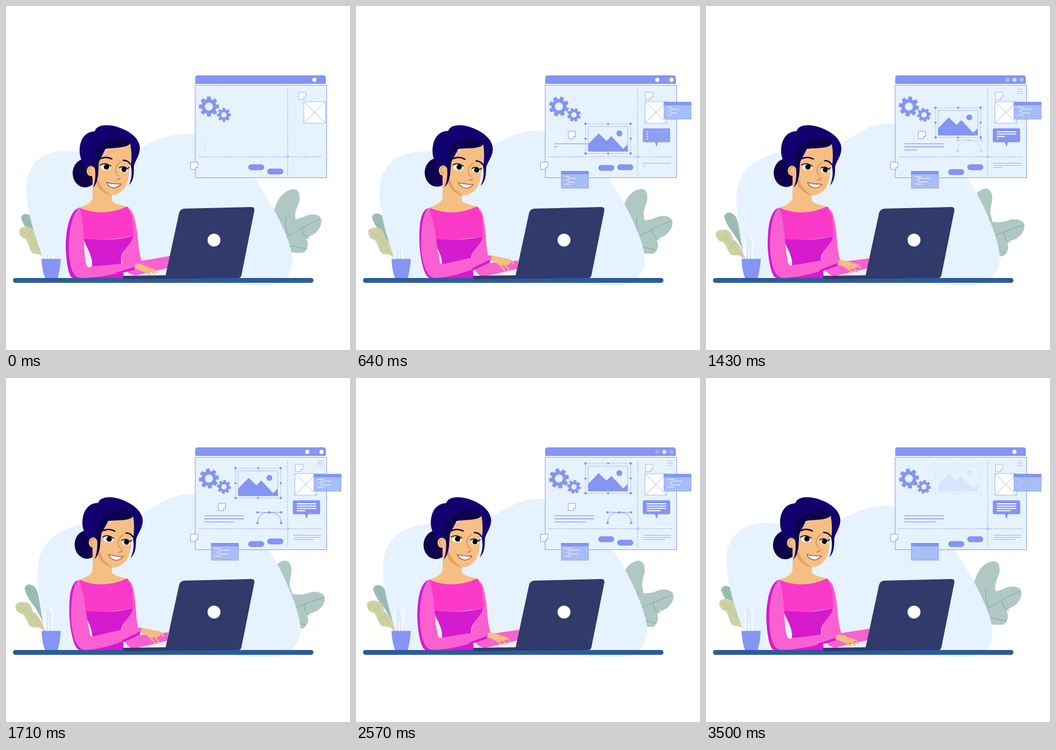
Write an HTML page that moves like this. It is 640 px wide and 640 px high and loops after 3570 ms.

```html
<!DOCTYPE html>
<html lang="en">
<head>
<meta charset="utf-8">
<title>Designer at work</title>
<style>
  html, body { margin: 0; width: 100%; height: 100%; overflow: hidden; background: #fff; }
  svg { display: block; width: 100%; height: 100%; }
  .line { fill: none; stroke: #8495f3; }
  .main { fill: #8495f3; }
  .skin { fill: #f5bf84; }
  .light { fill: #fb60d3; }
  .plum { fill: #d41bcd; }
  .hair { fill: #130070; }
  .dark { fill: #0e024c; }
</style>
</head>
<body>
<svg viewBox="0 0 640 640" xmlns="http://www.w3.org/2000/svg">
  <defs>
    <g id="note" stroke="#8495f3">
      <path d="M0 0H13.5V9.5L9.5 13.5H0Z" fill="#fff"/>
      <path d="M13.5 9.5H9.5V13.5" fill="#e6f2fe"/>
    </g>
  </defs>

  <!-- plants -->
  <g id="teal">
    <path d="M75 475C58 425 36 422 28 394C30 386 40 384 48 392C58 402 60 440 75 475Z" fill="#9bbcb4"/>
    <path d="M34 393Q50 415 62 445" fill="none" stroke="#86aaa4" stroke-width=".7"/>
  </g>
  <g id="olive">
    <path d="M74 474C65 458 57 463 50 460C42 455 44 442 36 433C28 432 24 424 25 416C30 409 42 410 49 414C58 422 52 430 60 435C68 445 72 460 74 474Z" fill="#ced1a3"/>
    <path d="M29 418Q52 432 71 468M44 429L47 418M42 428L35 429M56 443L58 434M54 442L46 446" fill="none" stroke="#b8bd8c" stroke-width=".7"/>
  </g>
  <path id="leafUp" fill="#b0c8c4" d="M505 450C498 420 490 395 501 374C506 356 520 341 536 341C548 342 548 358 544 368C538 382 537 388 539 398L540 440Z"/>
  <g id="leafLow">
    <path fill="#b0c8c4" d="M505 450L515 395C530 400 540 397 550 394C562 387 575 385 584 392C590 400 586 412 578 420C570 429 558 428 560 436C564 445 560 455 553 459C545 460 535 458 515 459Z"/>
    <path d="M510 438Q545 414 585 396M521 392Q518 412 526 427M550 413Q551 428 565 433M515 446Q537 446 559 452" fill="none" stroke="#6f9cb0" stroke-width=".9"/>
  </g>
  <path id="blob" fill="#e6f2fe"/>
  <g id="sprigs" stroke-width="1.8" stroke-dasharray="7 2"></g>
  <path class="main" d="M66 470.500H102Q100 495 96 506H72.500Q67 492 66 470.500Z"/>

  <!-- browser window -->
  <path class="main" d="M352 145V134Q352 129 357 129H590Q595 129 595 134V145Z"/>
  <g id="dots" fill="#fff"></g>
  <rect class="line" x="352" y="147.500" width="244.500" height="172" style="fill:#e6f2fe"/>
  <path class="line" d="M524 154V315M358 280.500H590" stroke-dasharray="2 2"/>
  <circle class="line" cx="524" cy="280.500" r="2" style="fill:#e6f2fe"/>
  <path class="main" id="gear1" fill-rule="evenodd"/>
  <path class="main" id="gear2" fill-rule="evenodd"/>
  <use href="#note" x="343.500" y="290.500"/>
  <use href="#note" x="538.500" y="160.500" id="sideNote" opacity=".65"/>
  <use href="#note" id="midNote"/>
  <g id="box" stroke="#8fb0ef" stroke-width=".9">
    <rect x="537.500" y="178" width="40.500" height="40" fill="#fff"/>
    <path d="M537.500 178L578 218M578 178L537.500 218"/>
  </g>
  <g id="menu" stroke="#a9bbf5"><path d="M579 154.500H589.500M579 158.500H589.500M579 162.500H589.500"/></g>
  <g id="text1" stroke="#8495f3" stroke-width="1.300"></g>
  <g id="text2" stroke="#8495f3" stroke-width=".8"></g>
  <g id="bubble">
    <path class="main" stroke="#6f82ec" stroke-width=".7" d="M536 228H582Q584 228 584 230V251Q584 253 582 253H561.500L559 261L556.500 253H536Q534 253 534 251V230Q534 228 536 228Z"/>
    <g id="text3" stroke="#fff" stroke-width="1.800"></g>
  </g>
  <g id="picture">
    <rect class="line" x="427" y="159" width="84" height="55.500" stroke-dasharray="2 2"/>
    <rect class="line" x="432" y="164" width="73.500" height="46.500" stroke-width=".6"/>
    <path class="main" d="M432 197L451.500 177L466 191L475 182L497 205.500L505.500 197V210.500H432Z"/>
    <circle class="main" cx="490" cy="177" r="5.500"/>
    <path class="main" d="M425 157h4v4h-4zM509 157h4v4h-4zM425 212.500h4v4h-4zM509 212.500h4v4h-4zM469 156.500l2.500 2.500-2.500 2.500-2.500-2.500zM469 212l2.500 2.500-2.500 2.500-2.500-2.500zM427 184.500l2.500 2.500-2.500 2.500-2.500-2.500zM511 184.500l2.500 2.500-2.500 2.500-2.500-2.500z"/>
  </g>
  <g id="curve">
    <path class="line" d="M468 250H512M468 269.500C468 257 477 250 490 250C503 250 512 257 512 269.500"/>
    <path class="main" d="M466 248h4v4h-4zM488 248h4v4h-4zM510 248h4v4h-4z"/>
    <circle class="main" cx="468" cy="269.500" r="2.200"/><circle class="main" cx="512" cy="269.500" r="2.200"/>
  </g>
  <rect class="main" id="pill1" x="451" width="29" height="10" rx="5" stroke="#6f82ec" stroke-width=".7"/>
  <rect class="main" id="pill2" x="486.500" width="29" height="10" rx="5" stroke="#6f82ec" stroke-width=".7"/>
  <g id="codes"></g>

  <!-- woman -->
  <ellipse class="dark" id="bun" cx="147" cy="311" rx="23" ry="26.500"/>
  <path class="skin" d="M161 310V355Q161 368 136 375Q180 396 225 373Q200 368 197 362V340Z"/>
  <path class="light" id="backArm"/>
  <path class="plum" d="M143 430Q190 440 237 428C232 447 213 455 214 472C215 485 219 492 219 507H135L150 490L160 484C162 465 150 450 143 432Z"/>
  <path fill="#fb39c8" d="M136 375Q180 394 225 373Q232 378 235 398L237 428Q190 438 143 433Z"/>
  <path class="plum" id="rim"/>
  <path class="light" id="arm"/>
  <path class="plum" id="cuff"/>
  <g id="head">
    <path class="skin" d="M172 285C176 270 190 262 232 256C235 275 234 288 229 297C229 310 229 325 222 337C214 347 206 352 198 352C185 348 172 338 166 328L160 318V295Z"/>
    <path d="M168 322C166 338 182 350 198 353C186 346 176 338 173 326Z" fill="#e0a264"/>
    <path class="hair" d="M137 272C136 250 146 234 165 233C168 222 185 219 204 224C232 232 250 248 249 266C248 280 240 288 238 298C238 312 238 325 229 333C234 322 235 308 232 297C234 285 234 270 231 256L185 266L173 290L166 302L155 300C143 296 138 285 137 272Z"/>
    <ellipse class="skin" cx="158" cy="307" rx="8" ry="9.500"/>
    <path d="M161 300Q154 300 154 307Q155 312 159 313" fill="none" stroke="#d99755" stroke-width="1.500"/>
    <path class="dark" d="M163 290C163 267 177 249 205 246C222 243 232 248 230 257C222 265 200 263 185 266C176 272 174 280 173 290C171 305 174 326 162 338C168 322 167 305 163 290Z"/>
    <g id="face">
      <path d="M214 290Q203 296 204 308Q206 315 211 317" fill="none" stroke="#d99755" stroke-width="1.800"/>
      <path d="M203 324Q212 326 214 318Q208 322 203 324Z" fill="#d08c50"/>
      <g fill="#fff"><ellipse cx="186" cy="300" rx="9.500" ry="5.800"/><ellipse cx="219" cy="304" rx="8" ry="5.300"/></g>
      <circle cx="187" cy="299.500" r="5"/><circle cx="219.500" cy="304" r="4.800"/>
      <g fill="none" stroke="#0c0330" stroke-linecap="round">
        <path d="M175 296Q184 290 195 298M211 301Q219 296 226 303L229 300" stroke-width="1.700"/>
        <path d="M176 284Q186 279 197 284.500M218 287Q227 287 231 294" stroke-width="2.500"/>
      </g>
      <path d="M187 328.500Q200 331.500 214 331Q209 338 201 338.500Q190 337 187 328.500Z" fill="#fff" stroke="#a5432f" stroke-width="1.300"/>
    </g>
  </g>

  <rect x="13" y="506" width="559" height="9" rx="4.500" fill="#2b5b9d"/>
  <path fill="#303a6b" d="M297 501L322 385Q324 378 331 377L456 374Q463 374 462 381L438 501Q437 506 432 506L220 508Q217 507 218 502Z"/>
  <circle cx="387" cy="435.500" r="12" fill="#fff"/>
  <path class="skin" id="palm"/>
  <path id="fingers" fill="none" stroke="#f0b678" stroke-width="2.800" stroke-linecap="round"/>
</svg>
<script>
const LOOP = 3570, STEP = LOOP / 50, TAU = Math.PI * 2;
const $ = id => document.getElementById(id);
const set = (el, name, value) => el.setAttribute(name, value);
const clamp = v => Math.min(1, Math.max(0, v));
const part = (t, start, span) => clamp((t - start) / span);
const swing = u => (1 - Math.cos(Math.PI * u)) / 2;
const ramp = (t, start, span) => swing(part(t, start, span));

function add(parent, tag, attrs) {
  const el = document.createElementNS("http://www.w3.org/2000/svg", tag);
  for (const name in attrs) set(el, name, attrs[name]);
  return parent.appendChild(el);
}

// eased value from a table of [time, value] steps
function track(t, steps) {
  let [t0, v0] = steps[0];
  for (const [t1, v1] of steps) {
    if (t < t1) return t <= t0 ? v0 : v0 + (v1 - v0) * ramp(t, t0, t1 - t0);
    [t0, v0] = [t1, v1];
  }
  return v0;
}

// blend two paths that share the same commands
function blend(a, b, k) {
  const to = b.match(/[\d.]+/g);
  let i = 0;
  return a.replace(/[\d.]+/g, n => (+n + (to[i++] - n) * k).toFixed(2));
}

const blobPaths = [
  "M38 340C38 295 65 270 112 270C165 270 200 296 250 265C285 244 310 238 335 238C395 238 440 285 475 340C505 385 533 445 533 472C533 500 515 519 490 519C400 519 250 505 75 505L75 490C60 440 38 390 38 340Z",
  "M58.5 365C58 310 90 285 137 273C180 262 215 272 250 256C285 236 305 216 345 216C410 216 450 265 490 322C515 358 548 435 548 467C548 500 520 519 490 519C400 519 250 505 80 505L79 490C76 455 59 415 58.5 365Z"];

const bodyPaths = {
  backArm: [
    "M225 373C236 378 240 395 244 420C246 445 248 460 252 474L305 465L303 487L242 501C229 501 219 492 215 470C215 455 230 445 237 430L231 378Z",
    "M225 373C236 378 238 395 241 420C243 445 243 460 250 478L302 473L300 489L240 503C229 504 219 494 215 470C215 455 230 445 237 430L231 378Z"],
  rim: [
    "M137 375C116 380 111 425 111 448C112 475 116 506 125 506L145 506Z",
    "M135 376C116 380 117 425 118 448C120 475 127 506 137 506L150 506Z"],
  arm: [
    "M137 375C124 385 117 415 117 450C118 480 122 506 140 506C175 506 210 497 242 489L244 476C220 478 190 483 160 484C154 488 150 487 148 475C144 455 146 400 137 375Z",
    "M135 376C124 383 120 420 121 448C122 475 130 507 148 506C185 504 220 490 249 476L253 465C225 464 200 473 160 481C156 482 155 475 154 465C149 445 147 400 135 376Z"],
  cuff: [
    "M205 496L241 485L239 491L205 499Z",
    "M216 488L250 472L248 478L216 493Z"],
  palm: [
    "M241 480C252 478 258 484 268 487L276 492C270 495 262 497 255 494L239 488Z",
    "M252 466C264 466 274 470 284 473L288 478C284 482 274 486 268 482L250 475Z"],
  fingers: [
    "M262 487Q276 488 281 496M262 491Q272 492 276 498M256 493Q262 497 268 499",
    "M276 472Q290 473 292 480M270 478Q280 484 284 492M264 480Q272 486 276 492"]
};

function gear(x, y, tip, root, hole) {
  const pts = [];
  for (let i = 0; i < 8; i++)
    for (const [off, r] of [[-.27, root], [-.19, tip], [.19, tip], [.27, root]]) {
      const a = i * TAU / 8 + off;
      pts.push((x + r * Math.sin(a)).toFixed(2) + " " + (y - r * Math.cos(a)).toFixed(2));
    }
  return `M${pts.join("L")}ZM${x - hole} ${y}a${hole} ${hole} 0 1 0 ${hole * 2} 0a${hole} ${hole} 0 1 0 ${-hole * 2} 0Z`;
}
set($("gear1"), "d", gear(377.5, 187, 18.8, 14, 7.5));
set($("gear2"), "d", gear(405.5, 202.5, 13, 9.8, 5));

// lines that type themselves: each gets a start time and a span
const typed = [];
function typeLines(id, x, y, gap, widths, start, delay, span, min) {
  widths.forEach((w, i) => typed.push({
    el: add($(id), "line", { x1: x, y1: y + gap * i, y2: y + gap * i }),
    x, w, start: start + delay * i, span, min
  }));
}
typeLines("text1", 369, 256.3, 5.7, [74, 74, 58], 0, 600, 550, 1.3);
typeLines("text2", 534.5, 292.5, 4, [51.5, 51.5, 41], 0, 600, 550, 1);
typeLines("text3", 541, 234, 4.3, [36, 36, 36, 26], 850, 215, 350, 2.5);

const dots = [560.5, 573.8, 587].map(cx => add($("dots"), "circle", { cx, cy: 137.3, r: 3.9 }));

const codeRows = [[6, 9.5, 13], [12, 13, 22], [9, 16.5, 7], [12, 20, 18], [6, 24, 13]];
const codes = [[573, 210.5], [382, 339]].map(([x, y]) => {
  const g = add($("codes"), "g", {});
  add(g, "rect", { y: -31.5, width: 50.5, height: 31.5, fill: "#a7bdf6", stroke: "#8495f3", "stroke-width": .8 });
  add(g, "rect", { y: -31.5, width: 50.5, height: 5, fill: "#8495f3", stroke: "#6f82ec", "stroke-width": .6 });
  const rows = codeRows.map(([rx, ry, w]) => ({
    w, rx, el: add(g, "line", { x1: rx, y1: ry - 31.5, y2: ry - 31.5, stroke: "#fff", "stroke-width": 1 })
  }));
  return { g, x, y, rows };
});

const sprigs = [[74, 72, 34], [77, 78, 42], [80, 83, 47], [83, 81, 38], [86, 88, 41]].map(([x, top, h], i) => ({
  x, top, h, el: add($("sprigs"), "line", { x1: x, y1: 470, stroke: i % 2 ? "#d6dee9" : "#fff" })
}));

const scaleAt = (x, y, s) => `translate(${x} ${y}) scale(${s}) translate(${-x} ${-y})`;
const turn = (id, a, x, y) => set($(id), "transform", `rotate(${a} ${x} ${y})`);

function draw(t) {
  const slow = swing(2 * t / LOOP);
  const phase = (t * 3 / LOOP) % 1;
  const pulse = swing(2 * phase);
  const lean = (1 - Math.abs(1 - 2 * phase) + Math.sin(Math.PI * phase)) / 1.8;

  set($("blob"), "d", blend(...blobPaths, slow));
  turn("teal", 4.5 * slow, 75, 475);
  turn("olive", -8 * slow, 75, 475);
  turn("leafUp", -10.5 * slow, 520, 440);
  turn("leafLow", 8 * slow, 500, 450);
  const grow = track(t, [[0, .2], [1700, 1]]);
  for (const s of sprigs) {
    set(s.el, "x2", s.x + (s.top - s.x) * grow);
    set(s.el, "y2", 470 - s.h * grow);
  }

  for (const id in bodyPaths) set($(id), "d", blend(...bodyPaths[id], lean));
  const tilt = `translate(${1.5 * lean} 0) rotate(${2 * lean} 185 370)`;
  set($("head"), "transform", tilt);
  set($("bun"), "transform", tilt);
  set($("face"), "transform", `translate(${.8 * lean} 0)`);

  dots.forEach((d, i) => set(d, "opacity", i === 1 ? 1 - pulse : pulse));
  turn("gear1", 360 * t / LOOP, 377.5, 187);
  turn("gear2", -360 * t / LOOP, 405.5, 202.5);

  const slide = 1 - ramp(t, 0, 700);
  set($("sideNote"), "transform", `translate(${6 * slide} 0)`);
  set($("box"), "transform", `translate(${16.5 * slide} 0)`);
  const pop = track(t, [[0, 0], [540, 1], [2980, 1], [3380, 0]]);
  set($("midNote"), "transform", `translate(${408.5 - 13.5 * pop} ${246.7 - 13.5 * pop}) scale(${pop})`);
  set($("menu"), "opacity", track(t, [[1000, 0], [1400, 1], [2550, 1], [2950, .12], [3080, .12], [3450, 1]]));

  for (const l of typed) set(l.el, "x2", l.x + Math.max(l.min, l.w * part(t, l.start, l.span)));
  set($("bubble"), "transform", scaleAt(559, 261, ramp(t, 0, 540)));
  set($("bubble"), "opacity", part(t, 200, 500));

  set($("picture"), "transform", `translate(0 ${60 * (1 - ramp(t, 860, 1140))})`);
  set($("picture"), "opacity", part(t, 50, 480) - part(t, 3150, 400));
  set($("curve"), "opacity", part(t, 1280, 420) - ramp(t, 2850, 520));

  set($("pill1"), "y", 295 + track(t, [[550, 0], [950, 9], [2150, 9], [2550, 0], [2950, 0], [3300, 9]]));
  set($("pill2"), "y", 295 + track(t, [[150, 8], [600, 0], [1420, 0], [2000, 8], [2450, 8], [2850, 0]]));

  const u = part(t, 70, 330);
  const size = 1 - (1 - u) ** 2;
  const code = Math.max(.12, part(t, 260, 540) - part(t, 2700, 760));
  for (const c of codes) {
    set(c.g, "transform", `translate(${c.x} ${c.y}) scale(${size})`);
    for (const r of c.rows) set(r.el, "x2", r.rx + r.w * code);
  }
}

// 14 pictures a second; the small lead absorbs timer rounding
function tick() {
  draw(Math.floor((performance.now() + 5) % LOOP / STEP) * STEP);
  requestAnimationFrame(tick);
}
tick();
</script>
</body>
</html>
```
